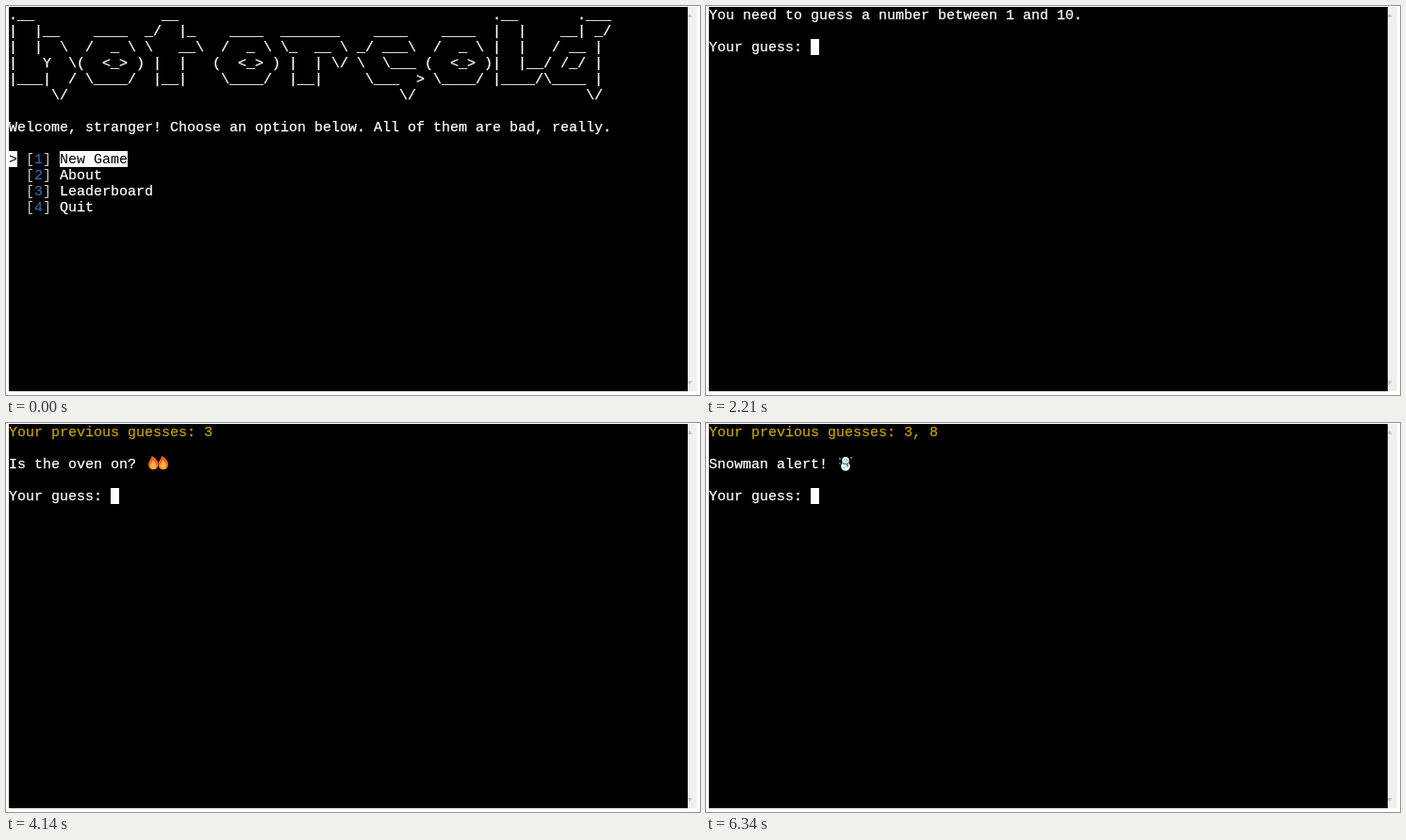
An HTML page for the animation above (8000 ms loop, 736 by 413 pixels).

```html
<!DOCTYPE html>
<html lang="en">
<head>
<meta charset="utf-8">
<title>Guessing game</title>
<style>
  html, body { margin: 0; width: 100%; height: 100%; overflow: hidden; background: #fff; }
  #terminal { position: absolute; left: 3px; top: 1px; width: 720px; height: 408px; overflow: hidden; background: #000; }
  #film { animation: film 8s step-end infinite; }
  pre {
    position: relative; top: 1px; margin: 0; height: 408px; color: #fff;
    font: 15px/17px "Liberation Mono", monospace; font-variant-ligatures: none;
    -webkit-text-stroke: .25px;
  }
  pre span { display: inline-block; height: 17px; vertical-align: top; }
  pre svg { position: absolute; width: 30px; height: 17px; margin-top: -1px; }
  /* The cell starts one pixel above its text. */
  pre .inverse {
    box-sizing: border-box; margin: -1px 0 1px; padding-top: 1px;
    background: #fff; color: #000; -webkit-text-stroke: 0;
  }
  .yellow { color: #c4a000; }
  .blue { color: #3465a4; }
  .bracket { color: #d4c0d4; -webkit-text-stroke: 0; }
  #scrollbar { position: absolute; left: 723px; top: 1px; width: 10px; height: 408px; background: #f0f0f0; }
  #scrollbar::before, #scrollbar::after {
    content: ""; position: absolute; left: 0; width: 5px; height: 4px;
    background: #c8c8c8; clip-path: polygon(40% 0, 100% 100%, 0 100%, 0 50%);
  }
  #scrollbar::before { top: 7px; }
  #scrollbar::after { top: 397px; transform: scaleY(-1); }
  @keyframes film {
    0% { transform: translateY(0); }
    10.75% { transform: translateY(-408px); }
    11.75% { transform: translateY(-816px); }
    27.625% { transform: translateY(-1224px); }
    45.75% { transform: translateY(-1632px); }
    50.75% { transform: translateY(-2040px); }
    51.75% { transform: translateY(-2448px); }
    73.25% { transform: translateY(-2856px); }
    78.25% { transform: translateY(-3264px); }
    79.25%, 100% { transform: translateY(-3672px); }
  }
</style>
</head>
<body>
<div id="terminal"><div id="film"></div></div>
<div id="scrollbar"></div>
<script>
const letters = {
  h: [8, String.raw`.__
|  |__
|  |  \
|   Y  \
|___|  /
     \/`],
  o: [8, String.raw`
  ____
 /  _ \
(  <_> )
 \____/
`],
  t: [8, String.raw`  __
_/  |_
\   __\
 |  |
 |__|
`],
  r: [9, String.raw`
_______
\_  __ \
 |  | \/
 |__|
`],
  c: [8, String.raw`
  ____
_/ ___\
\  \___
 \___  >
     \/`],
  l: [6, String.raw`.__
|  |
|  |
|  |__
|____/
`],
  d: [8, String.raw`    .___
  __| _/
 / __ |
/ /_/ |
\____ |
     \/`]
};

const letterRow = (name, row) => {
  const [width, art] = letters[name];
  return art.split("\n")[row].padEnd(width);
};
const banner = [0, 1, 2, 3, 4, 5]
  .map(row => [..."hotorcold"].map(name => letterRow(name, row)).join(""))
  .join("\n").replace(/</g, "&lt;");

const paint = (style, text) => `<span class="${style}">${text}</span>`;
const cursor = paint("inverse", " ");

const option = (label, i) => {
  const number = paint("bracket", "[") + paint("blue", i + 1) + paint("bracket", "]");
  return i ? `  ${number} ${label}` : `${paint("inverse", "&gt;")} ${number} ${paint("inverse", label)}`;
};
const menu = (title, ...labels) => `${banner}\n\n${title}\n\n${labels.map(option).join("\n")}`;

// The three moments of a prompt: waiting, typed, entered.
const prompt = (intro, answer) => {
  const line = `${intro}\n\nYour guess: `;
  return [line + cursor, line + answer + cursor, `${line}${answer}\n${cursor}`];
};
const history = (guesses, hint) =>
  `${paint("yellow", `Your previous guesses: ${guesses}`)}\n\n${hint}`;

const flame = x => `<g transform="translate(${x})">
  <path fill="#f4602a" d="M0 9C0 5 3 4 3.500 0C8 2 11 6 10.500 10C10 13 8 14.500 5.300 14.500C2 14.500 0 12.500 0 9Z"/>
  <path fill="#fdb43c" d="M2 10.500C2 8 4 7 4.500 4.500C7 6 8.700 8.500 8.500 10.800C8 13 7 14 5.300 14C3.500 14 2 12.500 2 10.500Z"/></g>`;
const fire = `<svg>${flame(4)}${flame(14.5)}</svg>`;
const snowman = `<svg>
  <g fill="#f3f8fb"><circle cx="10" cy="4.800" r="3.800"/><circle cx="10" cy="11" r="4.800"/>
    <circle cx="4" cy="3" r=".8"/><circle cx="16" cy="2" r=".8"/><circle cx="4" cy="8" r=".7"/></g>
  <path fill="none" stroke="#3a9bd5" stroke-width="2" d="M6.500 7.500Q10 9.500 13.500 7.500M12 8.500V11.500"/>
  <g fill="#333"><circle cx="8.500" cy="4" r=".6"/><circle cx="11.500" cy="4" r=".6"/><circle cx="9" cy="12" r=".6"/></g>
  <path fill="#f28c28" d="M9.500 5H12L9.500 6Z"/></svg>`;

const scenes = [
  menu("Welcome, stranger! Choose an option below. All of them are bad, really.",
    "New Game", "About", "Leaderboard", "Quit"),
  banner,
  menu("Choose a difficulty level, I dare you.", "Beginner", "Intermediate", "Expert", "Go back"),
  ...prompt("You need to guess a number between 1 and 10.", 3),
  ...prompt(history("3", `Is the oven on? ${fire}`), 8),
  prompt(history("3, 8", `Snowman alert! ${snowman}`), "")[0]
];
document.getElementById("film").innerHTML = scenes.map(scene => `<pre>${scene}</pre>`).join("");
</script>
</body>
</html>
```
